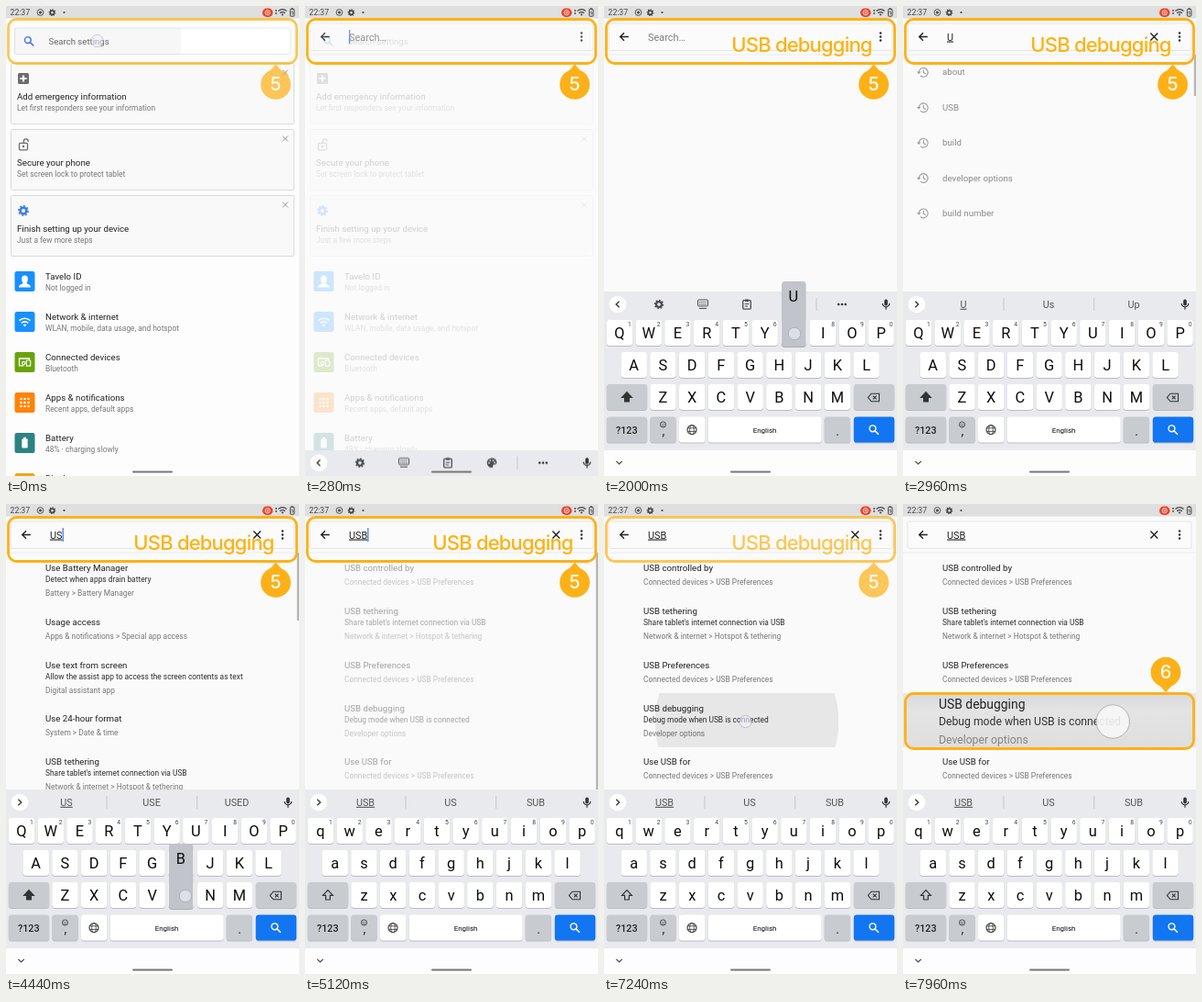
Recreate the animation shown at these times as an HTML page. Size 320 by 512 pixels, loop 8 s.

```html
<!DOCTYPE html>
<html lang="en">
<head>
<meta charset="utf-8">
<title>Turning on USB debugging</title>
<style>
html, body { margin: 0; width: 100%; height: 100%; overflow: hidden; background: #fafafa; }
svg { display: block; width: 100%; height: 100%; font-family: Roboto, "Noto Sans", sans-serif; }
.line { fill: none; stroke: #444; stroke-width: 1.2; }
.hint { font-family: Inter, "Open Sans", sans-serif; font-weight: 500; }
.typed { text-decoration: underline; }
.touch { fill: #eef0fb; fill-opacity: .75; stroke: #9a9da6; stroke-width: .7; }
.grow { transform-box: fill-box; transform-origin: center; }
</style>
</head>
<body>
<svg id="stage" viewBox="0 0 320 512" preserveAspectRatio="none"></svg>
<script>
const LOOP = 8000;
const INK = '#222', GREY = '#777', GOLD = '#fdb118';
let css = '';

// ---- animation helpers, times in ms ----
function anim(id, prop, stops, ease = 'linear') {
  const steps = stops.map(([t, v]) => `${t / LOOP * 100}%{${prop}:${v}}`).join('');
  css += `@keyframes ${id}{${steps}}#${id}{animation:${id} ${LOOP}ms ${ease} infinite}`;
}
const show = (id, ...spans) => anim(id, 'opacity',
  [[0, 0], ...spans.flatMap(([a, b]) => [[a, 1], [b, 0]])], 'step-end');
const fade = (id, ...stops) => anim(id, 'opacity',
  [[0, stops[0][1]], ...stops, [LOOP, stops.at(-1)[1]]]);

// ---- drawing helpers ----
const text = (x, y, size, str, fill = INK, attr = '') =>
  `<text x="${x}" y="${y}" font-size="${size}" fill="${fill}" ${attr}>${str}</text>`;
const mid = (x, y, size, str, fill = INK, attr = '') => text(x, y, size, str, fill, `text-anchor="middle" ${attr}`);
const rect = (x, y, w, h, r, fill, attr = '') =>
  `<rect x="${x}" y="${y}" width="${w}" height="${h}" rx="${r}" fill="${fill}" ${attr}/>`;
const disc = (x, y, r, fill, attr = '') => `<circle cx="${x}" cy="${y}" r="${r}" fill="${fill}" ${attr}/>`;
const line = (d, color = '#444', w = 1.2, attr = '') =>
  `<path d="${d}" fill="none" stroke="${color}" stroke-width="${w}" ${attr}/>`;
const shape = (d, fill) => `<path d="${d}" fill="${fill}"/>`;
const group = (id, ...parts) => `<g id="${id}">${parts.join('')}</g>`;
const put = (x, y, body, s = 1) => `<g transform="translate(${x} ${y}) scale(${s})">${body}</g>`;

const gear = (x, y, color, s = 1) => put(x, y,
  disc(0, 0, 3.1, 'none', `stroke="${color}" stroke-width="2.4"`) +
  disc(0, 0, 4.7, 'none', `stroke="${color}" stroke-width="1.6" pathLength="16" stroke-dasharray="1 1"`), s);
const lens = (x, y, color, s = 1) => put(x, y,
  disc(-1.2, -1.2, 3.6, 'none', `stroke="${color}" stroke-width="1.5"`) + line('M1.5 1.5L5.6 5.6', color, 1.7), s);
const cross = (x, y, r, color, w) =>
  line(`M${x - r} ${y - r}l${2 * r} ${2 * r}M${x + r} ${y - r}l${-2 * r} ${2 * r}`, color, w);
const dots = (x, y, dx, dy, r) => [-1, 0, 1].map(i => disc(x + i * dx, y + i * dy, r, '#333')).join('');
const wifi = (x, y, color, s = 1) => put(x, y,
  line('M-6 -2.2Q0 -7 6 -2.2M-3.8 .6Q0 -2.4 3.8 .6', color, 1.6) + shape('M-2 2.4Q0 .8 2 2.4L0 4.8Z', color), s);
const mic = (x, y) => put(x, y, rect(-1.8, -5.5, 3.6, 7, 1.8, '#333') +
  line('M-3.8 -1A3.8 3.8 0 0 0 3.8 -1M0 2.8V5.8', '#333', 1.2));

// ---- status bar ----
const status = rect(0, 0, 320, 13.5, 0, '#dfdfdf') +
  text(4.5, 10.3, 8.7, '22:37', '#444') +
  disc(37.5, 7, 3.4, 'none', 'stroke="#444" stroke-width=".9"') + disc(37.5, 7, 1.5, '#444') +
  gear(50.5, 7.2, '#444', .7) + disc(63.5, 7, 1.1, '#444') +
  rect(280, 2.5, 11.5, 9.5, 4.7, '#e8442c') +
  disc(285.7, 7.2, 2.6, 'none', 'stroke="#fff" stroke-width=".8"') + disc(285.7, 7.2, 1, '#fff') +
  disc(295, 5, .9, '#444') + disc(295, 8, .9, '#444') +
  wifi(302, 7.2, '#444', .76) +
  rect(310.4, 3.4, 4.4, 7.8, .8, 'none', 'stroke="#444"') + rect(311.7, 2.2, 1.8, 1.2, 0, '#444') +
  line('M312.9 5l-1 2.4h1.6l-1 2.4', '#444', .7);

// ---- settings home ----
const card = (y, title, note, icon) =>
  rect(5.5, y, 309, 66, 1, '#f9f9f9', 'stroke="#dadada"') + put(19, y + 16.5, icon) +
  text(12, y + 39.2, 9.7, title) + text(12, y + 51.2, 8.4, note, GREY) +
  cross(305, y + 10, 2.9, '#888', .9);
const entry = (y, color, title, note, icon) =>
  rect(9.5, y - 11, 22, 22, 2.5, color) + put(20.5, y, icon) +
  text(43, y - 2, 9.7, title) + text(43, y + 10.2, 8.4, note, GREY);
const grid = [-4, 0, 4].flatMap(x => [-4, 0, 4].map(y => rect(x - 1.1, y - 1.1, 2.2, 2.2, 0, '#fff'))).join('');

const home = group('home',
  rect(0, 0, 320, 512, 0, '#fdfdfd'),
  rect(9.5, 24, 301.5, 28.5, 2, '#fff', 'stroke="#e4e4e4" stroke-width=".8"'),
  `<g clip-path="url(#bar)"><circle id="barRipple" class="grow" cx="99" cy="38" r="92" fill="#000" fill-opacity=".03"/></g>`,
  lens(25, 38.2, '#3b78e7', .95),
  text(46.5, 41.8, 9.6, 'Search settings', '#666'),
  card(62.5, 'Add emergency information', 'Let first responders see your information',
    rect(-6, -6, 12, 12, 1.5, '#6c6c6c') + line('M0 -3.6V3.6M-3.6 0H3.6', '#fff', 2.2)),
  card(134.5, 'Secure your phone', 'Set screen lock to protect tablet',
    rect(-4.5, -1.6, 9, 7.4, 1, 'none', 'stroke="#6c6c6c" stroke-width="1.3"') + disc(0, 2, 1.2, '#6c6c6c') +
    line('M.4 -1.8V-3.8A2.4 2.4 0 0 1 5.2 -3.8V-3', '#6c6c6c', 1.3)),
  card(206.5, 'Finish setting up your device', 'Just a few more steps', gear(0, 0, '#3f7de8', 1.08)),
  entry(300, '#1890ff', 'Tavelo ID', 'Not logged in',
    shape('M-3.4 -2.6a3.4 4 0 0 1 6.8 0c0 2.4-1 3.6-1.6 4.2c.2 1.6 4.4 1.4 4.8 4.8h-13.2c.4-3.4 4.6-3.2 4.8-4.8c-.6-.6-1.6-1.8-1.6-4.2Z', '#fff')),
  entry(344, '#1890ff', 'Network &amp; internet', 'WLAN, mobile, data usage, and hotspot', wifi(0, .8, '#fff')),
  entry(388, '#69a30a', 'Connected devices', 'Bluetooth',
    line('M-1 3.8H-6V-4H5V-2.6', '#fff', 1.3) + rect(1.8, -2, 4.4, 6.2, .6, 'none', 'stroke="#fff" stroke-width="1.2"') +
    disc(-1.2, 1, 1.6, 'none', 'stroke="#fff" stroke-width="1.1"')),
  entry(432, '#ff8307', 'Apps &amp; notifications', 'Recent apps, default apps', grid),
  entry(476, '#2d8282', 'Battery', '48% · charging slowly',
    rect(-3.2, -4.6, 6.4, 10, .8, '#fff') + rect(-1.4, -6.2, 2.8, 2, 0, '#fff')),
  entry(520, '#eba81c', 'Display', 'Wallpaper, sleep, font size', ''));

// ---- search screen ----
function results(id, rows) {
  let y = 73;
  return group(id, ...rows.map(([title, path, note]) => {
    const top = y, drop = note ? 12 : 0;
    y += note ? 58.7 : 47;
    return text(43, top, 9.7, title) + (note ? text(43, top + 11.9, 8.4, note, '#2c2c2c') : '') +
      text(43, top + 14.9 + drop, 8.4, path, GREY);
  }));
}
const past = ['about', 'USB', 'build', 'developer options', 'build number'].map((word, i) => {
  const y = 72.2 + i * 38.4;
  return put(22, y, line('M-4.6 0A4.9 4.9 0 1 1 -3 3.8M.4 -2.8V.4L2.8 1.8', '#9a9a9a', 1.1) + shape('M-7 -.6H-2.4L-4.7 2Z', '#9a9a9a')) +
    text(43, y + 3.2, 9.7, word, '#8a8a8a');
}).join('');
const tether = ['USB tethering', 'Network &amp; internet > Hotspot &amp; tethering', "Share tablet's internet connection via USB"];
const thumb = (id, h) => group(id, rect(317.8, 53, 2.2, h, 0, '#b5b5b5'));
const typed = (id, word) => group(id, text(48, 37.5, 10.9, word, '#222', 'class="typed"'));
const caret = (id, x) => group(id, rect(x, 26, 1.3, 15, 0, '#4a80e8'));

const search = rect(0, 0, 320, 512, 0, '#fafafa') +
  rect(0, 52.6, 320, .8, 0, '#e9e9e9') +
  rect(5, 19, 310, 29.4, 1.5, '#fbfbfb', 'stroke="#e0e0e0" stroke-width=".8"') +
  line('M26.8 33.5H18M22 29.2L17.7 33.5L22 37.8', '#222', 1.4) + dots(302, 33.5, 0, 4, 1.25) +
  group('clear', cross(274.3, 33.5, 3.9, '#222', 1.4)) +
  group('empty', text(48, 37.5, 10.9, 'Search…', '#7c7c7c')) +
  typed('word1', 'U') + typed('word2', 'US') + typed('word3', 'USB') +
  caret('caret0', 48) + caret('caret1', 55.2) + caret('caret2', 61.6) + caret('caret3', 68.2) +
  group('past', past) +
  results('found2', [
    ['Use Battery Manager', 'Battery > Battery Manager', 'Detect when apps drain battery'],
    ['Usage access', 'Apps &amp; notifications > Special app access'],
    ['Use text from screen', 'Digital assistant app', 'Allow the assist app to access the screen contents as text'],
    ['Use 24-hour format', 'System > Date &amp; time'],
    tether]) +
  results('found3', [
    ['USB controlled by', 'Connected devices > USB Preferences'],
    tether,
    ['USB Preferences', 'Connected devices > USB Preferences'],
    ['USB debugging', 'Developer options', 'Debug mode when USB is connected'],
    ['Use USB for', 'Connected devices > USB Preferences']]) +
  thumb('thumb1', 45) + thumb('thumb2', 74) + thumb('thumb3', 258) +
  `<g clip-path="url(#row)"><g id="rowFade"><circle id="rowRipple" class="grow" cx="156" cy="237" r="100" fill="#000" fill-opacity=".075"/></g></g>`;

// ---- keyboard ----
const PITCH = 31.73, DARK = '#c8ccd1';
const key = (x, y, w, fill = '#fff') =>
  rect(x, y + 1, w, 28, 3.4, '#b9bdc3') + rect(x, y, w, 28, 3.4, fill);
const rows = [['qwertyuiop', 2.8, 342], ['asdfghjkl', 18.5, 377], ['zxcvbnm', 50.3, 412]];
const eachKey = draw => rows.map(([keys, x, y]) => [...keys].map((k, i) => draw(k, x + i * PITCH, y)).join('')).join('');
const letters = upper => eachKey((k, x, y) => mid(x + 14.2, y + 20.2, 16.4, upper ? k.toUpperCase() : k, '#0c0c0c'));
const arrow = fill => `<path d="M25 420.6L30.4 426.4H27.4V431H22.6V426.4H19.6Z" fill="${fill}" stroke="#333" stroke-width="1.2"/>`;
const words = (id, list) => group(id,
  disc(15, 325, 9.3, '#fff'), line('M13.4 321.8L16.8 325L13.4 328.2', '#333', 1.3),
  line('M110 318V332M208.7 318V332', '#c4c7cb', 1),
  ...list.map((w, i) => mid(66 + i * 93, 328.8, 10.8, w, '#555', i ? '' : 'class="typed"')));
const pop = (id, letter, x, y) => group(id,
  rect(x - 13, y - 41, 26, 71, 3, '#a9acb2'), rect(x - 13, y - 42, 26, 71, 3, '#c1c4ca'),
  mid(x - .4, y - 20.2, 16.4, letter, '#0c0c0c'));

const tools = group('tools',
  disc(15, 325, 9.3, '#fff'), line('M16.6 321.8L13.2 325L16.6 328.2', '#333', 1.3),
  gear(60, 325, '#4a4d52', .95),
  put(108, 324.5, rect(-5.5, -4.5, 11, 7, 1, 'none', 'stroke="#4a4d52"') +
    line('M-3.8 -2H4M-3.8 .4H4', '#4a4d52', 1.2, 'stroke-dasharray="1.2 .9"') + line('M-4 5H4', '#4a4d52', 1)),
  put(156, 325, rect(-4.3, -4.3, 8.6, 9.4, 1, 'none', 'stroke="#4a4d52" stroke-width="1.3"') +
    rect(-2, -5.6, 4, 2.6, .6, '#4a4d52') + line('M-2.3 -.4H2.3M-2.3 2H1', '#4a4d52', 1)),
  put(204, 325, shape('M0 -5.3A5.3 5.3 0 0 0 0 5.3C2 5.3 .8 3.4 1.4 2.4C2 1.4 5.4 2.6 5.4 -.6A5.4 4.8 0 0 0 0 -5.3Z', '#4a4d52') +
    [[-3, 0], [-1.6, -2.6], [1.6, -2.6], [3.2, -.3]].map(([x, y]) => disc(x, y, .9, '#e8eaed')).join('')),
  line('M232 318V332', '#c4c7cb', 1), dots(260, 325, 3.8, 0, 1.3));

const board = group('board',
  rect(0, 311, 320, 174, 0, '#e8eaed'), rect(0, 484, 320, 28, 0, '#fdfdfd'),
  line('M13.4 495.8L16.6 499L19.8 495.8', '#444', 1.2),
  tools, words('words1', ['U', 'Us', 'Up']), words('words2', ['US', 'USE', 'USED']), words('words3', ['USB', 'US', 'SUB']),
  mic(308, 325),
  eachKey((k, x, y) => key(x, y, 28.4)),
  ...[...'1234567890'].map((n, i) => mid(28 + i * PITCH, 349.4, 6.8, n, '#444')),
  key(2.8, 412, 44.4, DARK), key(272.8, 412, 44.4, DARK),
  key(2.8, 447.6, 44.4, DARK), key(50.3, 447.6, 28.4, DARK), key(82, 447.6, 28.4), key(113.7, 447.6, 124),
  key(240.7, 447.6, 28.4, DARK), key(272.8, 447.6, 44.4, '#1275f2'),
  group('lower', letters(false), arrow('none')), group('upper', letters(true), arrow('#333')),
  line('M292 422.2H300.5V430.8H292L288.4 426.5Z', '#333', 1.1), cross(295.7, 426.5, 1.9, '#333', 1.1),
  mid(24.8, 465.8, 10.8, '?123', INK, 'font-weight="500"'),
  disc(64.5, 456, 3.1, 'none', 'stroke="#333" stroke-width=".8"'), disc(63.4, 455.2, .5, '#333'), disc(65.6, 455.2, .5, '#333'),
  line('M62.9 456.8Q64.5 458.6 66.1 456.8', '#333', .7),
  mid(64.8, 468.4, 14, ','), mid(255, 468.4, 14, '.'),
  put(96, 461.6, disc(0, 0, 5, 'none', 'class="line"') +
    '<ellipse rx="2.3" ry="5" class="line" style="stroke-width:.9"/>' + line('M-4.6 -1.8H4.6M-4.6 1.8H4.6', '#444', .9)),
  mid(175.6, 464.8, 8, 'English', '#0c0c0c'), lens(294.6, 461.4, '#fff', .95),
  pop('popU', 'U', 207.3, 342), pop('popS', 'S', 64.5, 377), pop('popB', 'B', 191.2, 412));

// ---- callouts and touches ----
const badge = (n, x, y, tip) => disc(x, y, 16.4, GOLD) +
  shape(`M${x - 8} ${y + tip * 13}L${x} ${y + tip * 22}L${x + 8} ${y + tip * 13}Z`, GOLD) +
  mid(x, y + 7, 20, n, '#fff', 'class="hint"');
const frame = (y, h, fill) => rect(2.5, y, 315, h, 9, fill, `stroke="${GOLD}" stroke-width="2.8"`);
const first = group('first', frame(14.5, 48, 'none'), badge(5, 294.6, 85.4, -1),
  group('hint', mid(216, 50.2, 22, 'USB debugging', '#ffb20f', 'class="hint" letter-spacing="-.8"')));
const second = group('second', frame(206.5, 60, 'url(#shade)'),
  text(39, 222.8, 13.9, 'USB debugging'),
  text(39, 240.6, 12.2, 'Debug mode when USB is connected', '#333'),
  text(39, 261.4, 12.2, 'Developer options', '#858585'),
  group('bigTouch', disc(229.2, 237, 18.2, '#f8f8f8', 'stroke="#a8a8a8" stroke-width=".9"')),
  badge(6, 287, 183.2, 1));

let touches = '';
function touch(id, x, y, from, to) {
  touches += group(id, disc(x, y, 6.7, '', 'class="touch"'));
  fade(id, [from - 30, 0], [from, .8], [to - 120, .8], [to, 0]);
}
touches += group('tapBar', disc(99.5, 38, 6.7, '', 'class="touch"'));
fade('tapBar', [40, .65], [200, 0]);
touch('tapShift1', 23, 426, 1520, 1760);
touch('tapU', 208, 357, 1960, 2360);
touch('tapShift2', 23, 426, 2680, 2900);
touch('tapS', 65, 390.5, 3080, 3540);
touch('tapShift3', 23, 426, 3800, 4080);
touch('tapB', 196, 427, 4430, 4800);
touch('tapRow', 154.5, 237, 7040, 7500);

// ---- timeline ----
fade('home', [120, 1], [320, 0]);
anim('barRipple', 'transform', [[0, 'scale(1)'], [160, 'scale(2.4)'], [LOOP, 'scale(2.4)']]);
anim('board', 'transform', [[0, 'translateY(201px)'], [260, 'translateY(201px)'], [500, 'translateY(0)'], [LOOP, 'translateY(0)']], 'ease-out');
show('empty', [0, 2160]);
show('clear', [2160, LOOP]);
show('word1', [2160, 3320]);
show('word2', [3320, 4640]);
show('word3', [4640, LOOP]);
show('caret0', [240, 680], [1160, 1640]);
show('caret1', [2160, 2720], [3200, 3320]);
show('caret2', [3320, 3840], [4425, 4640]);
show('caret3', [4640, 5240], [5745, 6200], [6660, 7140]);
show('tools', [0, 2160]);
show('words1', [2160, 3320]);
show('words2', [3320, 4640]);
show('words3', [4640, LOOP]);
show('lower', [0, 1640], [2160, 2800], [3320, 3920], [4640, LOOP]);
show('upper', [1640, 2160], [2800, 3320], [3920, 4640]);
show('popU', [1980, 2160]);
show('popS', [3120, 3320]);
show('popB', [4425, 4640]);
fade('past', [2160, 0], [2320, 1], [3000, 1], [3120, 0]);
fade('found2', [3000, 0], [3160, 1], [5000, 1], [5080, 0]);
fade('found3', [5040, 0], [5240, 1]);
show('thumb1', [2840, 3920]);
show('thumb2', [3920, 5040]);
fade('thumb3', [5030, 0], [5050, 1], [6480, 1], [6680, 0]);
fade('rowFade', [7030, 0], [7080, 1]);
anim('rowRipple', 'transform', [[0, 'scale(.1)'], [7040, 'scale(.1)'], [7240, 'scale(1)'], [7460, 'scale(2)'], [LOOP, 'scale(2)']]);
fade('hint', [960, 0], [1000, .16], [1320, 1]);
fade('first', [0, .72], [120, 1], [7120, 1], [7240, .72], [7440, 0]);
fade('second', [7480, 0], [7840, 1]);
fade('bigTouch', [7840, .82], [7960, .9]);

document.getElementById('stage').innerHTML = `<style>${css}</style><defs>
  <clipPath id="bar"><rect x="9.5" y="24" width="301.5" height="28.5"/></clipPath>
  <clipPath id="row"><rect y="206" width="320" height="59"/></clipPath>
  <linearGradient id="shade" x2="0" y2="1"><stop stop-color="#d9d9d9"/><stop offset=".3" stop-color="#e4e4e4"/><stop offset="1" stop-color="#dedede"/></linearGradient>
  </defs>` + search + home + board + status + rect(138, 506.4, 44, 2, 1, '#777') + first + second + touches;
</script>
</body>
</html>
```
